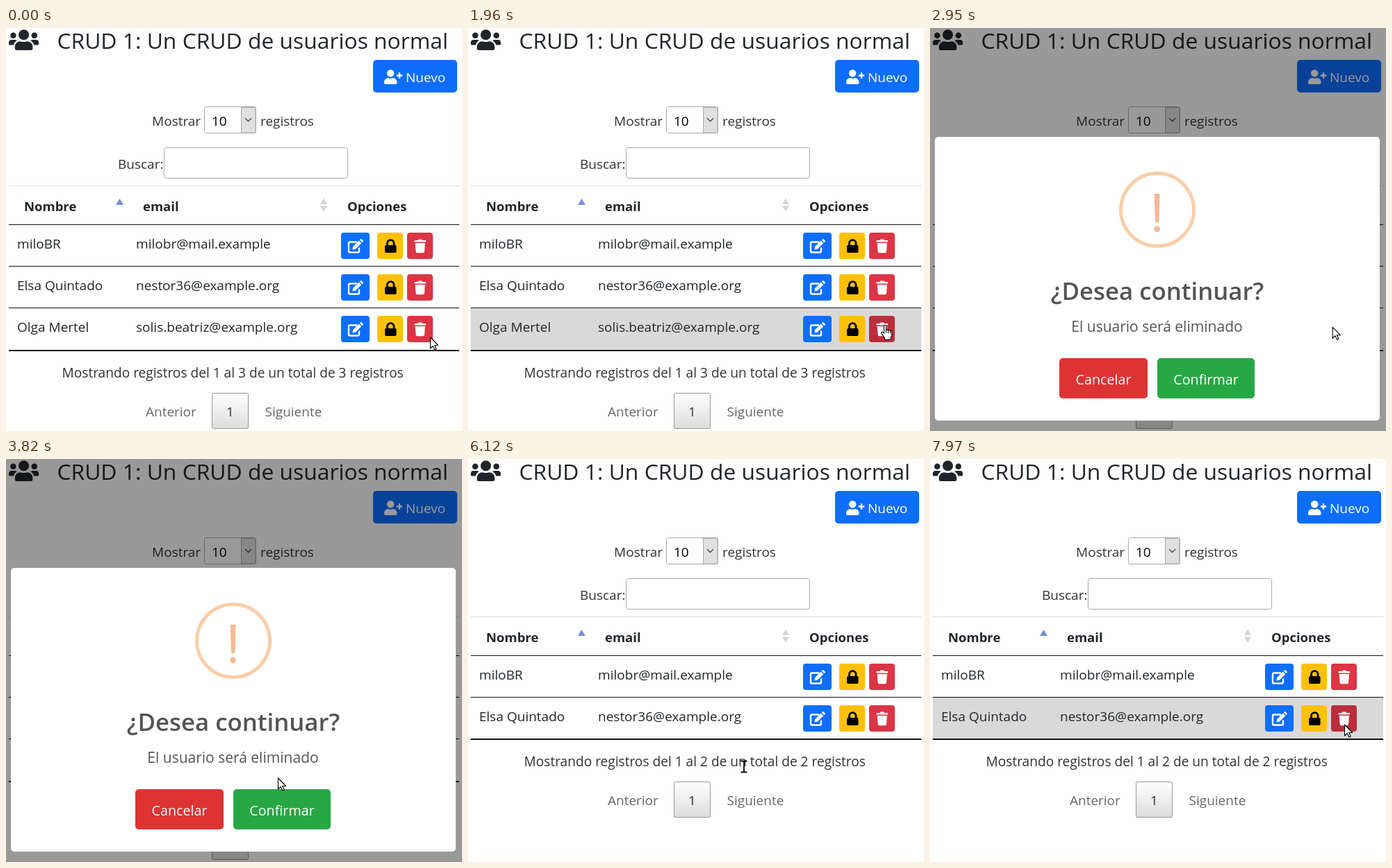
These frames come from a looping animation (656 px wide and 581 px high, 8 s). An HTML page:

```html
<!DOCTYPE html>
<html lang="es">
<head>
<meta charset="utf-8">
<title>CRUD de usuarios</title>
<style>
  html, body { margin: 0; width: 100%; height: 100%; overflow: hidden; background: #fefefe; }
  svg { display: block; font: 19px "Open Sans", "Noto Sans", sans-serif; fill: #212529; }
  .label { fill: #333; }
  .muted { fill: #666; }
  .head { font-size: 18.5px; font-weight: 700; }
  .mid { text-anchor: middle; }
  .white { fill: #fff; }
  .box { fill: #fff; stroke: #aaa; }
  .line { stroke: #111; }
  .pointer { fill: #fff; stroke: #000; stroke-width: 1.1; stroke-linejoin: round; }
</style>
</head>
<body>
<svg width="656" height="581" viewBox="0 0 656 581">
  <defs>
    <linearGradient id="pageFill" x2="0" y2="1">
      <stop stop-color="#fff"/><stop offset="1" stop-color="#dcdcdc"/>
    </linearGradient>
    <path id="sideUser" d="M4 23v-1.8a4.3 4.3 0 0 1 4.3-4.2h4.3q2 0 3.2 1.3-4 2.2-4.8 6.2H6q-2 0-2-1.5zM6.1 10.8a4.3 4.3 0 1 1 8.6 0a4.3 4.3 0 1 1-8.6 0z"/>
    <g id="editIcon">
      <path d="M505 308.5h-10q-2 0-2 2v11q0 2 2 2h11q2 0 2-2v-5" fill="none" stroke="#fff" stroke-width="2.4"/>
      <path class="white" d="M498.5 319.5l.6-4.3 8.6-8.6 3.6 3.6-8.6 8.6zM508.8 305.6l1-1q1-.8 2 0l1.6 1.6q.8 1 0 2l-1 1z"/>
    </g>
    <g id="lockIcon">
      <rect x="545" y="313" width="16.6" height="11" rx="2" fill="#000"/>
      <path d="M548.5 314v-3.5a4.8 4.8 0 0 1 9.6 0v3.5" fill="none" stroke="#000" stroke-width="2.8"/>
    </g>
    <path id="trashIcon" class="white" d="M587.6 306h5l1-1.4h4.4l1 1.4h5v2.4h-16.4zM588.7 310h14.2l-.9 12.3q-.2 1.9-2 1.9h-8.4q-1.8 0-2-1.9z"/>
  </defs>

  <use href="#sideUser"/>
  <use href="#sideUser" transform="translate(51.2) scale(-1 1)"/>
  <circle cx="25.6" cy="9.7" r="7.5"/>
  <path d="M12.8 29.5V27a7.8 7.8 0 0 1 7.8-7.8c2 1 8 1 10 0a7.8 7.8 0 0 1 7.8 7.8v2.5q0 2.5-3 2.5H15.8q-3 0-3-2.5z"/>
  <text x="73.5" y="30" font-size="31.8">CRUD 1: Un CRUD de usuarios normal</text>

  <rect x="528" y="46" width="121" height="47" rx="5" fill="#0d6efd"/>
  <g class="white">
    <circle cx="553.2" cy="65.2" r="5.2"/>
    <path d="M544 79v-1.3a5.8 5.8 0 0 1 5.6-5.6c2 1 5 1 7.2 0a5.8 5.8 0 0 1 5.7 5.6V79q0 2-2 2H546q-2 0-2-2z"/>
    <path d="M566 64.3v8.4M561.8 68.5h8.4" stroke="#fff" stroke-width="2.4"/>
    <text x="575" y="78">Nuevo</text>
  </g>

  <g class="label">
    <text x="210" y="141">Mostrar</text>
    <text x="366" y="141">registros</text>
    <text x="161" y="203">Buscar:</text>
  </g>
  <rect class="box" x="285.5" y="113.5" width="74" height="38" rx="3"/>
  <rect x="338.5" y="114.5" width="20.5" height="36.5" fill="#e0e0e0" stroke="#aaa"/>
  <path d="M344 130l4.5 4.5 4.5-4.5" fill="none" stroke="#444" stroke-width="1.3"/>
  <text x="296" y="141" fill="#000">10</text>
  <rect class="box" x="227.5" y="172.5" width="264" height="44" rx="3"/>

  <path d="M4 227.5H652" stroke="#ddd"/>
  <g class="head">
    <text x="26" y="264">Nombre</text>
    <text x="197" y="264">email</text>
    <text x="491" y="264">Opciones</text>
  </g>
  <path d="M158 255l5.5-9 5.5 9z" fill="#7490d8"/>
  <path d="M452 254l5-8.5 5 8.5zM452 256.5h10l-5 8z" fill="#d5d5d8"/>
  <g id="rows"></g>
  <path class="line" d="M4 283.5H652"/>

  <g id="footer">
    <path d="M4 465H652" stroke="#111" stroke-width="2"/>
    <text id="info" class="label" x="80.5" y="504" font-size="19.12"></text>
    <text class="muted" x="201" y="560">Anterior</text>
    <rect x="296.5" y="526.5" width="52" height="51" rx="2" fill="url(#pageFill)" stroke="#979797"/>
    <text class="label mid" x="322.5" y="560">1</text>
    <text class="muted" x="372.5" y="560">Siguiente</text>
  </g>

  <rect id="shade" width="656" height="581" fill="#000"/>
  <g id="modal">
    <rect class="white" x="7" y="157" width="640" height="409" rx="5"/>
    <circle cx="327" cy="262" r="52.5" fill="none" stroke="#facea8" stroke-width="5"/>
    <path d="M322.6 239h8l-1.3 41h-5.4z" fill="#f5b994"/>
    <circle cx="326.6" cy="290" r="4.4" fill="#f5b994"/>
    <g class="mid" fill="#545454">
      <text x="327" y="392" font-size="34.8" font-weight="600">¿Desea continuar?</text>
      <text x="326.5" y="438" font-size="21">El usuario será eliminado</text>
    </g>
    <g id="cancel">
      <rect x="186" y="476" width="127" height="58" rx="5" fill="#d33"/>
      <text class="white mid" x="249.5" y="514" font-size="19.7">Cancelar</text>
    </g>
    <g id="confirm">
      <rect id="confirmBox" x="327" y="476" width="140" height="58" rx="5"/>
      <text class="white mid" x="397" y="514" font-size="19.7">Confirmar</text>
    </g>
    <circle id="loader" cx="394" cy="505" r="19.5" fill="none" stroke="#2778c4" stroke-width="5"
            pathLength="4" stroke-dasharray="1"/>
  </g>

  <g id="cursor">
    <path id="arrow" class="pointer" d="M.5 0v16l3.7-3.5 2.6 5.6 2.4-1.1-2.5-5.5h5z"/>
    <path id="hand" class="pointer" d="M-1.5 1.5q1.5-3 3 0v6q2-1.4 3 .4 2-1 3 .6 2-.4 2.2 1.8v4q0 2-1.5 4v3H-.5v-2.4l-4-5.6q-2-2.5.2-3 1.6 0 2.8 2zM1.5 7.5v4M4.5 8v4M7.5 8.6v3.6"/>
    <path id="beam" d="M-4.5-7.5h3.5l1 1 1-1h3.5M0-7V7.5M-4.5 8.5h3.5l1-1 1 1h3.5" fill="none" stroke="#000" stroke-width="1.8"/>
  </g>
</svg>
<script>
const LOOP = 8000, ROW = 60, TABLE_TOP = 284;
const SHOW = 2265, LOADING = 4250, HIDE = 4676, REMOVED = 4900;
const $ = id => document.getElementById(id);
const clamp = v => Math.min(1, Math.max(0, v));
const mix = (a, b, p) => a + (b - a) * p;
const show = (id, on) => $(id).setAttribute('display', on ? 'inline' : 'none');

const users = [
  ['miloBR', 'milobr@mail.example'],
  ['Elsa Quintado', 'nestor36@example.org'],
  ['Olga Mertel', 'solis.beatriz@example.org']
];
const button = (x, width, fill, icon, id = '') =>
  `<rect ${id} x="${x}" y="295" width="${width}" height="38" rx="4" fill="${fill}"/><use href="#${icon}"/>`;
$('rows').innerHTML = users.map(([name, email], i) => `
  <g id="row${i}" transform="translate(0 ${i * ROW})">
    <rect id="hover${i}" x="4" y="284" width="648" height="60" fill="#d9d9d9"/>
    <text x="16" y="318">${name}</text><text x="187" y="318">${email}</text>
    ${button(482, 41, '#0d6efd', 'editIcon')}
    ${button(534, 37, '#ffc107', 'lockIcon')}
    ${button(577, 37, '#dc3545', 'trashIcon', `id="trash${i}"`)}
    ${i < 2 ? '<path class="line" d="M4 343.5H652"/>' : ''}
  </g>`).join('');

// Pointer stops: time, x, y
const path = [
  [870, 610, 446], [1250, 601, 376], [1400, 604, 380], [1530, 607, 397], [1750, 600, 428],
  [2730, 600, 428], [3820, 391, 460], [3930, 391, 490], [4250, 391, 490], [4800, 507, 495],
  [5250, 507, 495], [6120, 397, 443], [6770, 570, 428], [6880, 570, 428], [7530, 596, 383]
];
function pointerAt(t) {
  const next = path.findIndex(stop => stop[0] > t);
  if (next <= 0) return path[next < 0 ? path.length - 1 : 0].slice(1);
  const [t0, x0, y0] = path[next - 1], [t1, x1, y1] = path[next];
  const p = (t - t0) / (t1 - t0), eased = p * p * (3 - 2 * p);
  return [mix(x0, x1, eased), mix(y0, y1, eased)];
}

function popScale(p) {
  if (p < .45) return mix(.7, 1.05, p / .45);
  if (p < .8) return mix(1.05, .95, (p - .45) / .35);
  return mix(.95, 1, clamp((p - .8) / .2));
}

const recorded = t => t < 976 ? 0 : 980 + 109.2 * Math.floor((t - 976) / 109.2);

function drawTable(t, x, y, open) {
  const count = t < REMOVED ? 3 : 2;
  const hovered = open || t < 980 ? -1 : Math.floor((y - TABLE_TOP) / ROW);
  let hot = false;
  users.forEach((_, i) => {
    const on = hovered === i && i < count;
    const local = y - i * ROW;
    const onTrash = on && x > 576 && x < 615 && local > 295 && local < 339;
    hot = hot || onTrash;
    show('row' + i, i < count);
    show('hover' + i, on);
    $('trash' + i).setAttribute('fill', onTrash ? '#bb2d3b' : '#dc3545');
  });
  $('footer').setAttribute('transform', `translate(0 ${(count - 3) * 61})`);
  $('info').textContent = `Mostrando registros del 1 al ${count} de un total de ${count} registros`;
  return hot;
}

function drawModal(t, open) {
  const closing = clamp((t - HIDE) / 150), loading = t >= LOADING;
  const scale = closing ? mix(1, .5, closing) : popScale(clamp((t - SHOW) / 300));
  show('modal', open);
  show('shade', open);
  $('shade').setAttribute('opacity', .4 * clamp((t - SHOW) / 100) * (1 - clamp((t - HIDE) / 100)));
  $('modal').setAttribute('opacity', 1 - closing);
  $('modal').setAttribute('transform', `translate(327 361.5) scale(${scale}) translate(-327 -361.5)`);
  $('cancel').setAttribute('transform', `translate(${loading ? 17 : 0} 0)`);
  show('confirm', !loading);
  show('loader', loading);
  $('confirmBox').setAttribute('fill', t < 3920 ? '#28a745' : t < 4030 ? '#24963e' : '#208637');
  $('loader').setAttribute('transform', `rotate(${(t - LOADING) * .24 - 135} 394 505)`);
}

function draw(t) {
  const [x, y] = pointerAt(t);
  const open = t >= SHOW && t < HIDE + 150;
  const hot = drawTable(t, x, y, open);
  drawModal(t, open);
  const onConfirm = t >= 3920 && t < LOADING;
  const kind = (hot && t < 7960) || onConfirm ? 'hand'
    : t > REMOVED && y > 426 && y < 450 && x < 572 ? 'beam' : 'arrow';
  ['arrow', 'hand', 'beam'].forEach(name => show(name, name === kind));
  $('cursor').setAttribute('transform', `translate(${x} ${y})`);
}

function tick() {
  draw(recorded(performance.now() % LOOP));
  requestAnimationFrame(tick);
}
tick();
</script>
</body>
</html>
```
